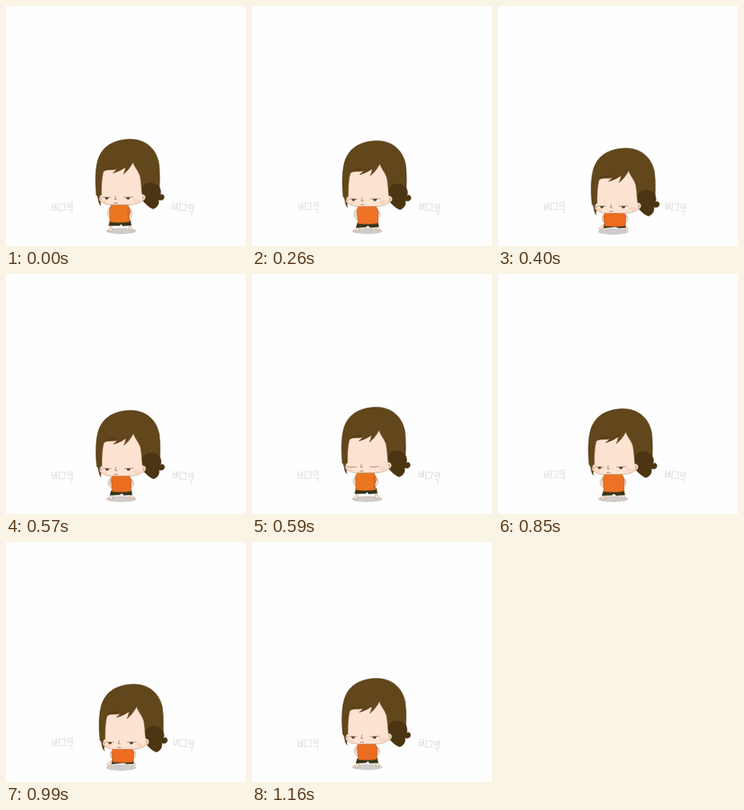
Animation of 300 by 300 pixels, one loop 1.18 s. Source, as an HTML page without scripts:

```html
<!DOCTYPE html>
<html lang="ko">
<head>
<meta charset="utf-8">
<title>Creaky squats</title>
<style>
  html, body { margin: 0; width: 100%; height: 100%; overflow: hidden; background: #fefefe; }
  svg { display: block; width: 100vw; height: 100vh; }
  path { stroke-linecap: round; stroke-linejoin: round; }

  .line { fill: none; stroke: #85603f; stroke-width: .7; }
  .skin { fill: #fde3d2; stroke: #a87c5a; stroke-width: .5; }
  .hair { fill: #62461c; stroke: #523812; stroke-width: .6; }
  .bun { fill: #4b3512; stroke: #443010; stroke-width: .6; }
  .lock { fill: none; stroke: #4a3310; stroke-width: .8; }
  .shirt { stroke: #a8501c; stroke-width: .6; }
  .fold { fill: none; stroke: #b5561c; stroke-width: .7; }
  .shorts { fill: #34361a; stroke: #2c2a14; stroke-width: .4; }
  .shadow { fill: #d0cccb; }
  .blush { fill: #f9cdb8; opacity: .6; }
  .creak { fill: none; stroke: #d6d4d2; stroke-width: .75; }

  /* One squat is half a loop; the eyes use the whole loop. */
  .pose { visibility: hidden; animation: .59s step-end infinite; }
  .stand { animation-name: stand; }
  .bend { animation-name: bend; }
  .low { animation-name: low; }
  .rise { animation-name: rise; }
  .low-text { animation-name: low-text; }
  .open, .closed { animation: open 1.18s step-end infinite; }
  .closed { animation-name: closed; }

  @keyframes stand { 0% { visibility: visible } 44.0678%, 100% { visibility: hidden } }
  @keyframes bend { 0% { visibility: hidden } 44.0678% { visibility: visible } 67.7966%, 100% { visibility: hidden } }
  @keyframes low { 0% { visibility: hidden } 67.7966% { visibility: visible } 96.6102%, 100% { visibility: hidden } }
  @keyframes rise { 0% { visibility: hidden } 96.6102%, 100% { visibility: visible } }
  @keyframes low-text { 0% { visibility: hidden } 44.0678% { visibility: visible } 96.6102%, 100% { visibility: hidden } }
  @keyframes open { 0% { opacity: 1 } 50%, 100% { opacity: 0 } }
  @keyframes closed { 0% { opacity: 0 } 50%, 100% { opacity: 1 } }
</style>
</head>
<body>
<svg viewBox="0 0 300 300" role="img" aria-label="삐그덕 삐그덕">
  <defs>
    <path id="hair" class="hair" d="M113 236C111.500 222 111.500 207 114 196C118 178 131 167.500 154 166.500C174 166 187.500 178 191 196C192.500 208 192.500 222 191 236L170 242L121 243C117.500 244 117.500 247 118.500 249.500C114.500 246 116.500 240 113 236Z"/>
    <g id="face">
      <path class="skin" d="M119.500 236C119.500 226 119.500 216 122 206.500C127 204 133 205.500 138 204.500C136.500 206 135 207.500 134 208.500C140 207 146 204 149 201.500C149 204 148 207 147 209.500C152 206 156 200 158.500 195C160 201 165.500 206 167.500 213C169 221 169 229 170 235.500C175.500 235 176 243 169.500 244C164 249 155 248.500 145 248.500C135 248.500 124 249.500 120 245C115.500 245 115.500 237 119.500 236Z"/>
      <path class="lock" d="M158.500 195C156 201 152 206 147 210M149 201C144 205 139 207 134 208.500M121.500 207C125 203 130 203 136 202"/>
      <path class="line" d="M170.500 238C172.500 237.500 173 240.500 170.500 242M117.500 239L119 242M137 237.500L135.800 241.500L138.300 241.800M135 246.300L139 246.300"/>
      <ellipse class="blush" cx="123" cy="244.500" rx="3" ry="2"/>
      <ellipse class="blush" cx="163" cy="243" rx="4" ry="2.500"/>
    </g>
    <g id="eyes">
      <path d="M121 239H130.500C130 243 122 243 121 239ZM147.500 239H159C157 243 149 243 147.500 239Z" fill="#fffaf4"/>
      <path d="M123.500 239H128.300C128.500 242.800 123.500 242.800 123.500 239ZM150 239H155.200C155.500 242.800 150 242.800 150 239Z" fill="#5c4022"/>
      <path class="line" d="M120.500 239L130.500 239.300M147.500 239.200L159 239"/>
    </g>
    <path id="lids" class="line" d="M120.500 241Q125 242 130.500 241M147.500 241Q153 242 158.500 240.500"/>
    <path id="bun" class="bun" d="M169 241C170 234 168 227 175 222.500C181 220 189 222 192 227C194 231 193.500 234 192.500 237C195 233.500 198.500 236.500 197.500 240C196 243.500 192 243 190.500 242C192 247 189 252 184 253.500C179 252 174 247 169 241Z"/>
    <ellipse id="shadow" class="shadow" cx="144" cy="281.300" rx="19" ry="3.900"/>
    <path id="feet" class="skin" d="M130.500 273L130 278C127 279.500 127 282 130 281.800C133.500 281.500 132.500 279 132.500 274ZM153.500 273L154 277.500C153.500 280 156 281.500 158 280.500C158.500 278.500 156.500 278 156 273Z"/>
    <path id="creak" class="creak" d="M57.500 247L58 255.500L62 255L61.500 247.500M58 251.500L61.500 251M63 247L63.300 255M66 245.500L66.500 257M68.500 247.500L74 247L73.500 252.500M68 255.500L75 254.500M80.500 246.500L77 247L77.300 251.500L81 251M79.500 249L82.500 248.700M82.500 245L83 253.500M78.500 255L82.500 255L82 259.500"/>
    <path id="creak-low" class="creak" d="M58 246.500L58.500 254.500L61.500 254.500L62 247M58.500 251L62 250.500M63.500 246.500L64 254.500M66.500 245.500L66.500 256M68.500 246.500L74 246L73.500 252M68.500 254.500L75.500 254M80.500 245.500L77 246L77.300 250.500L81 250.300M79.500 248.500L82.500 248.200M82.500 244.500L83 252.500M78 254.500L82.500 254L82 258.500"/>
  </defs>

  <rect width="300" height="300" fill="#fefefe"/>

  <g class="pose stand">
    <use href="#creak"/>
    <use href="#creak" transform="translate(151.500 -1.500) rotate(9 58 250)"/>
    <use href="#shadow"/>
    <use href="#feet"/>
    <path class="shorts" d="M130 268L128.500 274.500L142 274.500L144 272.500L146 275L156.500 274L155.500 268Z"/>
    <path class="skin" d="M130 251C126 257 125.500 262 129.500 265L131 261L129 258ZM153 251C159 256 159 261 154 266L152 262L155 258Z"/>
    <path class="shirt" fill="#eb761f" d="M131.500 248.500L129.500 256L130 270C137 271 147 271 155 269.500L153.500 263L155.500 257L152.500 248.500Z"/>
    <path class="fold" d="M153 252L152 258L154 261L152 267"/>
    <use href="#hair"/>
    <use href="#bun"/>
    <use href="#face"/>
    <use class="open" href="#eyes"/>
    <use class="closed" href="#lids"/>
  </g>

  <g class="pose low-text">
    <use href="#creak-low"/>
    <use href="#creak-low" transform="translate(151.500 -1) rotate(9 58 250)"/>
  </g>

  <g class="pose bend">
    <use href="#shadow"/>
    <use href="#feet" x="1"/>
    <path class="shorts" d="M132 271L130 277L142 276.500L145 274.500L148 277L158.500 276L157.500 271Z"/>
    <path class="skin" d="M131.500 253C126 259 126.500 264 132 267L133 263L130 260.500ZM156 253C162 259 161 264 156 267L155 262L158.500 260Z"/>
    <path class="shirt" fill="#ee7226" d="M133 250L131.500 257L132.500 272C140 273 151 273 157.500 271.500L157.500 257L155 250Z"/>
    <use href="#hair" x="1" y="2"/>
    <use href="#bun" x="1" y="1"/>
    <use href="#face" x="1" y="2"/>
    <use href="#eyes" x="1" y="2"/>
  </g>

  <g class="pose low">
    <use href="#shadow" y=".7"/>
    <path class="skin" d="M132 273L129 276C125 277 125 279.500 129 279.500L134 277ZM158 273L160 276C163.500 277 163 279.500 159 279.500L156 277Z"/>
    <path class="shorts" d="M133 273L132 277.500L143 276.500L147 276L151 277.500L159.500 277L159 273Z"/>
    <path class="skin" d="M133 260C129 264 129.500 268 133 271L134 267ZM159 260C164 264 163 268 159 271L158 267Z"/>
    <path class="shirt" fill="#ee6b1f" d="M134 258L132 263L133.500 275C141 276 152 276 159 275L160 263L157 258Z"/>
    <use href="#hair" x="4.500" y="11.300"/>
    <use href="#bun" x="4" y="9"/>
    <use href="#face" x="4.500" y="10.500"/>
    <use href="#eyes" x="4" y="11"/>
  </g>

  <g class="pose rise">
    <use href="#creak" y=".5"/>
    <use href="#creak" transform="translate(151.500 -1) rotate(10 58 250)"/>
    <use href="#shadow"/>
    <use href="#feet" x="1"/>
    <path class="shorts" d="M131.500 271L130 276.500L142 276L145 274L147 276.500L157.500 276L156.500 270Z"/>
    <path class="skin" d="M131.500 254C126 260 127 265 132.500 268L133.500 264L130 262ZM154.500 254C161.500 260 161 264 155 268L154 264L158 261Z"/>
    <path class="shirt" fill="#ea6d20" d="M133 252L131.500 258L133 272C140 273 149 273 156 271.500L156.500 258L154 252Z"/>
    <use href="#hair" x=".5" y="4"/>
    <use href="#bun" x=".5" y="2.500"/>
    <use href="#face" x=".5" y="4"/>
    <use href="#eyes" x=".5" y="4"/>
  </g>
</svg>
</body>
</html>
```
